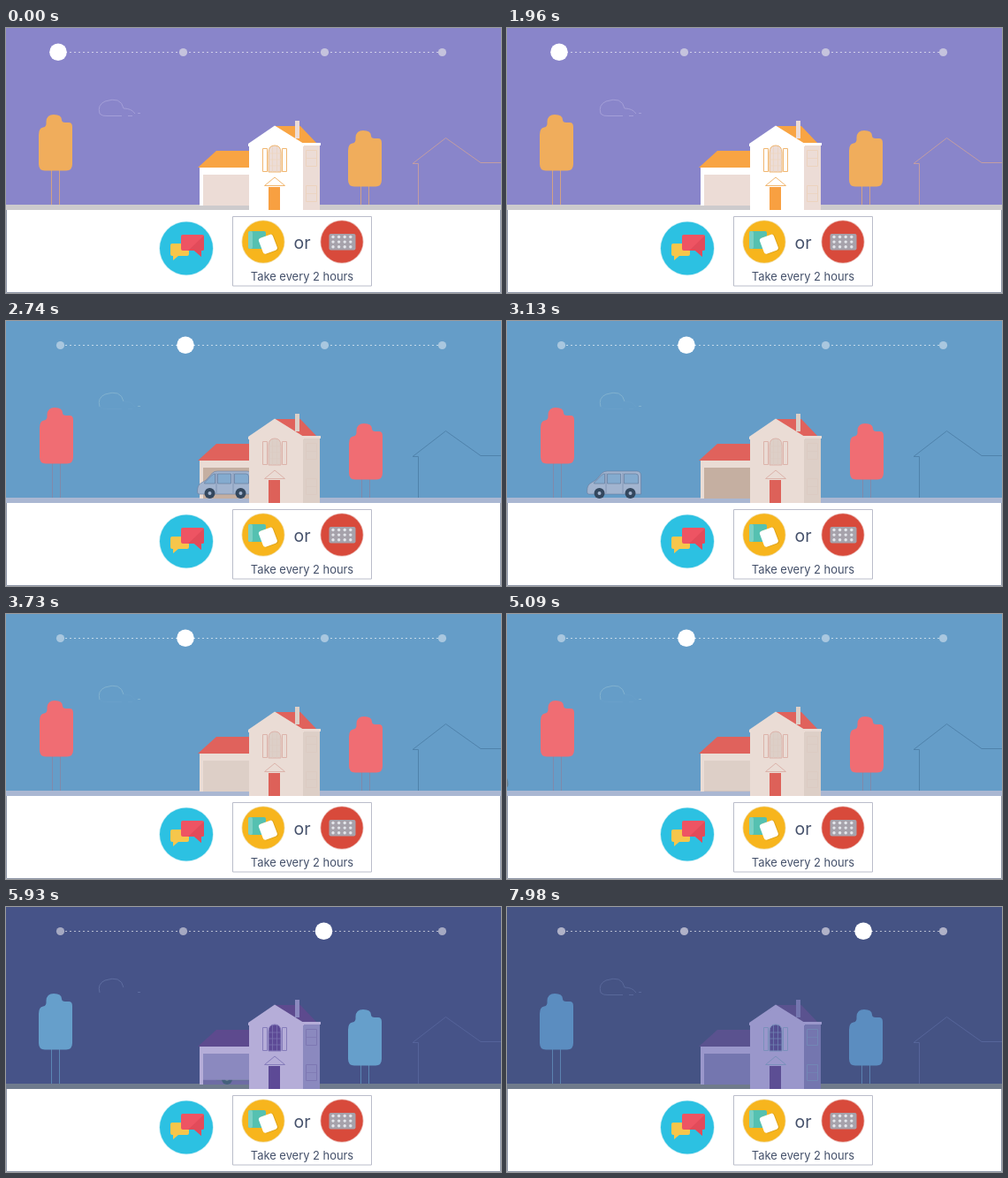
Write an HTML page with a canvas that moves like this. It is 560 by 300 pixels and loops after 8000 ms.

```html
<!DOCTYPE html>
<html lang="en">
<head>
<meta charset="utf-8">
<title>House through the day</title>
<style>
html, body { margin: 0; width: 560px; height: 300px; overflow: hidden; background: #fff; }
canvas { display: block; }
</style>
</head>
<body>
<canvas id="stage" width="560" height="300"></canvas>
<script>
const ctx = document.getElementById('stage').getContext('2d');
const LOOP = 8000;

// Palettes: morning, day, evening, night
const keys = 'sky ground tree trunk wall shade roof door trim pane window far cloud cloudBase dot'.split(' ');
const scenes = [
  '8985ca cdcbcd f0ad5c d2a184 ffffff ecdcd6 f8a443 f8a041 f0b670 ecd3be ecdcd6 c29da3 a49fd8 a49fd8 c5c3dd',
  '659dc8 aab7d2 f06d73 8089aa eadcd5 ddcfc7 e0625c dd6159 dcb3aa dccbc2 ddcfc7 4f82ab 82b2cf 69a0ca a9c7df',
  '465388 6f7b8e 669fcb 5b87b4 b5add8 8b89bf 5d4a8e 5d4a96 857cba 7d77b2 5d4a96 55639a 5e6da0 465388 a5a9c2',
  '455384 707b8c 5b8dc0 5b82b0 9a97cb 7476af 5a528f 5c4e94 7a90bb 7287b5 554f92 56659a 59689a 59689a b0b2c8'
].map(list => list.split(' ').map(hex => [0, 2, 4].map(i => parseInt(hex.substr(i, 2), 16))));

const ramp = (t, from, to) => Math.min(1, Math.max(0, (t - from) / (to - from)));
const easeInOut = p => p < .5 ? 2 * p * p : 1 - 2 * (1 - p) ** 2;
const css = rgb => `rgb(${rgb.map(Math.round)})`;

function palette(t) {
  const [i, p] = t < 5090 ? [0, ramp(t, 2290, 2585)]
    : t < 7890 ? [1, ramp(t, 5090, 5385)] : [2, ramp(t, 7890, 7980)];
  return Object.fromEntries(keys.map((key, k) =>
    [key, css(scenes[i][k].map((v, n) => v + (scenes[i + 1][k][n] - v) * p))]));
}

function shape(d, fill, stroke, width = 1) {
  const path = new Path2D(d);
  if (fill) { ctx.fillStyle = fill; ctx.fill(path); }
  if (stroke) { ctx.strokeStyle = stroke; ctx.lineWidth = width; ctx.stroke(path); }
}
function box(x, y, w, h, fill, stroke, r = 0) {
  ctx.beginPath();
  ctx.roundRect(x, y, w, h, r);
  if (fill) { ctx.fillStyle = fill; ctx.fill(); }
  if (stroke) { ctx.strokeStyle = stroke; ctx.lineWidth = 1; ctx.stroke(); }
}
function disc(x, y, r, fill) {
  ctx.beginPath();
  ctx.arc(x, y, r, 0, 7);
  ctx.fillStyle = fill;
  ctx.fill();
}
function at(x, y, draw) {
  ctx.save();
  ctx.translate(x, y);
  draw();
  ctx.restore();
}

function timeline(t, c) {
  ctx.setLineDash([2, 3]);
  shape('M62 27.5H493', null, 'rgba(255,255,255,.6)');
  ctx.setLineDash([]);
  const x = 59 + 144 * easeInOut(ramp(t, 2290, 2516))
    + 156.5 * easeInOut(ramp(t, 5090, 5316))
    + 134.5 * easeInOut(ramp(t, 7890, 8116));
  for (const stop of [61.5, 200.5, 360.5, 493.5]) disc(stop, 27.5, 4.6, c.dot);
  disc(x, 27.3, 9.8, '#fff');
}

function tree(c, trunk) {
  shape(`M14.5 62v${trunk}M23.5 62v${trunk}`, null, c.trunk);
  shape('M0 23Q0 15 5 14.500Q9 14 8.500 8Q9 0 17 0Q26 0 26 6Q26 9 30 9H34Q38 9 38 14V56Q38 63.500 31 63.500H7Q0 63.500 0 56Z', c.tree);
}

function scenery(t, c) {
  shape('M106 97Q103 87 112 83Q130 77 133 91', null, c.cloud);
  shape('M133 91Q142 91 146 97M106 97Q109 100 114 99.5H131M138 99.5H143', null, c.cloudBase);
  shape('M149 96.5H152', null, c.cloud);
  shape('M560 152.5H537L497.5 124.5L460 153.5H466.5V200', null, c.far);
  ctx.fillStyle = c.ground;
  ctx.fillRect(0, 200, 560, 6);
  const drift = ramp(t, 2290, 2585) - ramp(t, 5090, 5385);
  at(37 + drift, 98, () => tree(c, 40));
  at(387 + drift, 116, () => tree(c, 22));
}

// Drawn facing left, 61 wide, standing on y = 201
function van(night) {
  const [body, glass, line, wheel] = night
    ? ['#6a8290', '#76909a', '#5c7686', '#44607c']
    : ['#a2b4cf', '#84abcf', '#667b9c', '#33475e'];
  shape('M0 193Q0 185 5 183L10 180L17 172Q19 170 23 170H56Q61 170 61 175V196H2Q0 196 0 193Z', body, line, .6);
  shape('M8 183L17 174Q18 173 20 173V184H8ZM23 173H38V184H23ZM42 173H55Q58 173 58 176V184H42Z', glass, line, .7);
  shape('M21.500 172V195M40.500 172V195', null, line, .5);
  for (const x of [14, 49]) {
    disc(x, 195, 6, wheel);
    disc(x, 195, 2, body);
  }
}

function traffic(t) {
  ctx.save();
  ctx.beginPath();
  ctx.rect(0, 0, 275, 206);
  ctx.clip();
  if (t > 2290 && t < 3400) {
    at(238 - 300 * ramp(t, 2500, 3400) ** 2, 0, () => van(false));
  } else if (t > 5090 && t < 5990) {
    const x = 238 - 300 * (1 - ramp(t, 5090, 5660)) ** 4;
    at(x + 61, 0, () => {
      ctx.scale(-1, 1);
      van(true);
    });
    const beam = ctx.createLinearGradient(x + 60, 0, x + 102, 0);
    beam.addColorStop(0, 'rgba(255,255,255,.75)');
    beam.addColorStop(1, 'rgba(235,240,255,.45)');
    ctx.globalAlpha = ramp(t, 5100, 5260);
    shape(`M${x + 60} 187L${x + 101} 181V198L${x + 60} 191Z`, beam);
  }
  ctx.restore();
}

function garage(t, c) {
  const open = ramp(t, 2290, 2500) - ramp(t, 3330, 3700)
    + ramp(t, 5090, 5250) - ramp(t, 5660, 5980);
  box(219, 158, 57, 43, c.wall);
  box(223, 166, 52, 35, c.shade);
  if (open > 0) box(223, 166, 52, 35, t < 4000 ? 'rgba(140,100,75,.3)' : 'rgba(65,65,125,.4)');
  traffic(t);
  box(223, 166, 52, 35 * (1 - open), c.shade);
  shape('M217 158L238 139H275V158Z', c.roof);
}

function house(c) {
  shape('M304 111H333L352 131H328Z', c.roof);
  box(327, 105, 5, 20, c.shade);
  box(336, 131, 19, 75, c.shade);
  box(335, 130, 21, 3, c.wall);
  shape('M274 131L304 110.500L337 131V134H336V206H275V134H274Z', c.wall);
  for (const y of [138.500, 178.500]) {
    box(339.500, y, 12, 18, null, c.pane);
    shape(`M340 ${y + 9}H351`, null, c.pane, .7);
  }
  for (const x of [290.500, 312.500]) box(x, 136.500, 5, 26, c.wall, c.trim);
  shape('M297 163V141Q297 133 304 133Q311 133 311 141V163Z', c.window, c.trim);
  shape('M301.500 134V163M306.500 134V163M297 142H311M297 149H311M297 156H311', null, c.pane, .7);
  shape('M292.500 178.500L304 169L315.500 178.500Z', c.wall, c.trim);
  box(297, 180, 13, 26, c.door);
}

function label(text, size, y) {
  ctx.font = `${size}px Inter, "Open Sans", sans-serif`;
  ctx.textAlign = 'center';
  ctx.fillStyle = '#44506a';
  ctx.fillText(text, 335, y);
}

function panel() {
  box(0, 206, 560, 94, '#fff');
  shape('M.5 206V299.500H559.500V206', null, '#8f97a8');
  disc(204, 249.500, 30.800, '#c9edf4');
  disc(204, 249.500, 30, '#2cc1e2');
  shape('M188 244H205Q207 244 207 246V256Q207 258 205 258H195L189 263V258H188Q186 258 186 256V246Q186 244 188 244Z', '#f6c64b');
  shape('M200 234H222Q224 234 224 236V250Q224 252 222 252H221V259L213 252H200Q198 252 198 250V236Q198 234 200 234Z', '#ee5463');
  shape('M224 235V250Q224 252 222 252H221V259L213 252H206Z', '#e24b5a');

  box(256.500, 213.500, 157, 78.500, '#fff', '#babdca');
  disc(291, 242, 24.500, '#f0dda8');
  disc(291, 242, 23.700, '#f7b51d');
  box(274, 230, 20, 20, '#55c1b1', null, 2);
  box(274, 230, 5, 20, '#7bd0c3', null, 2);
  at(297, 245, () => {
    ctx.rotate(-.36);
    box(-8, -10, 17, 20, '#dfa41b', null, 3);
    box(-9, -10, 17, 19, '#fff', null, 3);
  });

  disc(380, 242, 24.500, '#e9b8b2');
  disc(380, 242, 23.700, '#d84a3b');
  box(365.500, 233, 30, 18.500, '#a6a2ab', null, 2);
  for (let i = 0; i < 12; i++) {
    disc(370 + i % 4 * 6.600, 236.500 + Math.floor(i / 4) * 5.600, 1.700, '#e3e5ea');
  }
  label('or', 19.500, 249.500);
  label('Take every 2 hours', 12.900, 285.500);
}

function draw(now) {
  const t = now % LOOP;
  const c = palette(t);
  ctx.fillStyle = c.sky;
  ctx.fillRect(0, 0, 560, 206);
  scenery(t, c);
  garage(t, c);
  house(c);
  timeline(t, c);
  panel();
  requestAnimationFrame(draw);
}
requestAnimationFrame(draw);
</script>
</body>
</html>
```
